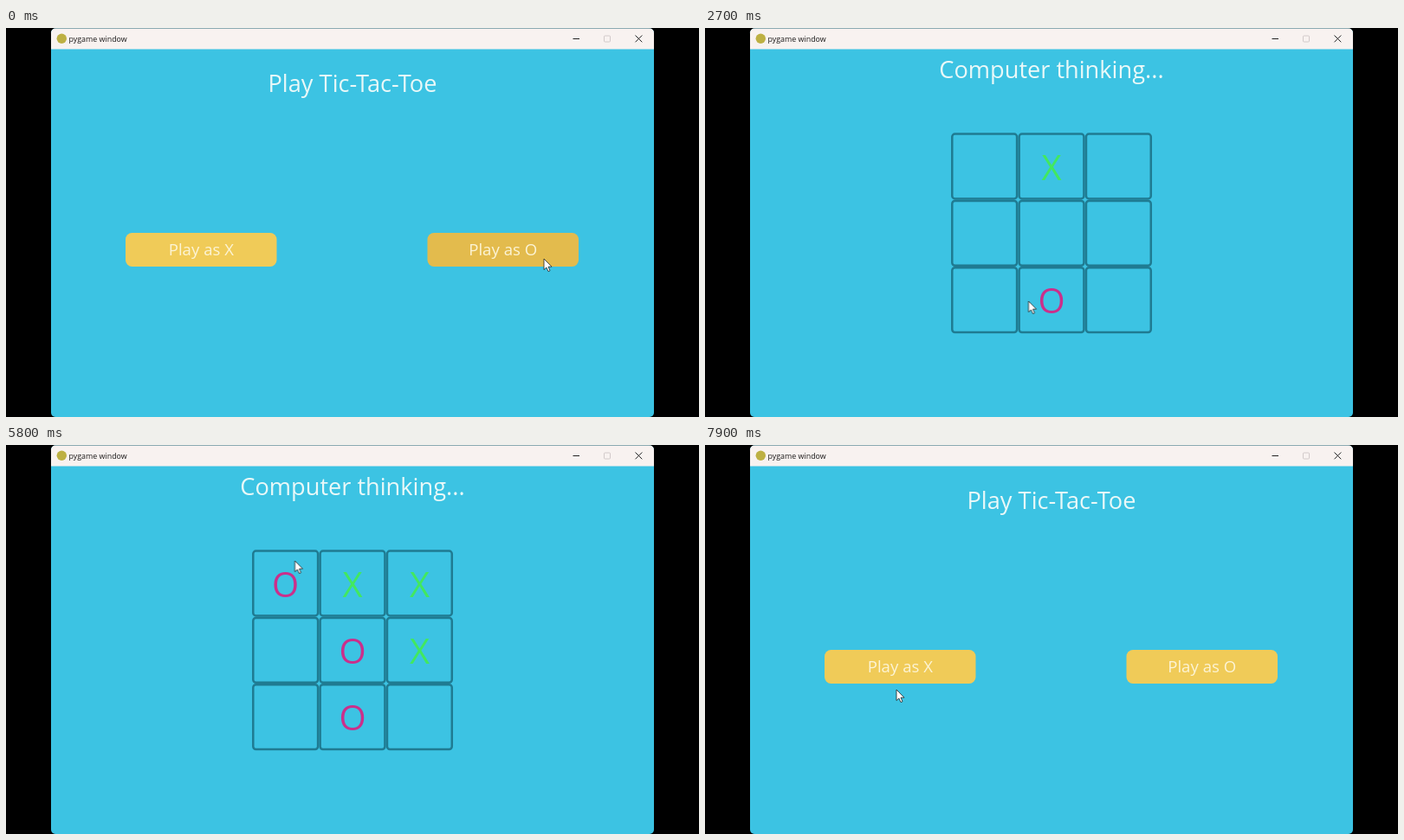
These frames come from a looping animation (800 px wide and 450 px high, 8000 ms). An HTML page:

```html
<!DOCTYPE html>
<html lang="en">
<head>
<meta charset="utf-8">
<title>Tic-Tac-Toe</title>
<style>
html, body { margin: 0; width: 100%; height: 100%; overflow: hidden; background: #000; }
svg { display: block; width: 800px; height: 450px; }
text { font-family: "Open Sans", "Noto Sans", sans-serif; text-anchor: middle; }

.title { font-size: 27.2px; fill: #e9f8f8; }
.label { font-size: 18.6px; fill: #fcf4d6; }
.caption { font-size: 8.9px; fill: #1c1a1a; text-anchor: start; }
.button { fill: #f0cb58; }
.cell { fill: none; stroke: #1f7b92; stroke-width: 2.5; }
.mark { font-size: 40px; }
.x { fill: #42e85f; }
.o { fill: #cb2f8b; }

/* Hard switches share one clock */
.step { animation: 8s step-end infinite; }
.menu { animation-name: menu; }
.board { animation-name: board; }
.thinking { animation-name: thinking; }
.turn { animation-name: turn; }
.over { animation-name: over; }
.hoverO { animation-name: hoverO; }
.hoverAgain { animation-name: hoverAgain; }
.x1 { animation-name: x1; }
.o1 { animation-name: o1; }
.x2 { animation-name: x2; }
.o2 { animation-name: o2; }
.x3 { animation-name: x3; }
.o3 { animation-name: o3; }
.cursor { animation: cursor 8s ease-in-out infinite; }

@keyframes menu { 0%, 93.75% { opacity: 1 } 12.5% { opacity: 0 } }
@keyframes board { 0%, 93.75% { opacity: 0 } 12.5% { opacity: 1 } }
@keyframes thinking {
  0%, 31.25%, 45%, 68.75% { opacity: 1 }
  23.75%, 37.5%, 51.25%, 75%, 100% { opacity: 0 }
}
@keyframes turn {
  0%, 31.25%, 45%, 68.75%, 100% { opacity: 0 }
  23.75%, 37.5%, 51.25% { opacity: 1 }
}
@keyframes over { 0% { opacity: 0 } 75%, 100% { opacity: 1 } }
@keyframes hoverO { 0% { fill: #e3bb4d } 12.5%, 100% { fill: #f0cb58 } }
@keyframes hoverAgain { 0% { fill: #f0cb58 } 83.75%, 100% { fill: #e3bb4d } }
@keyframes x1 { 0% { opacity: 0 } 23.75%, 100% { opacity: 1 } }
@keyframes o1 { 0% { opacity: 0 } 31.25%, 100% { opacity: 1 } }
@keyframes x2 { 0% { opacity: 0 } 37.5%, 100% { opacity: 1 } }
@keyframes o2 { 0% { opacity: 0 } 45%, 100% { opacity: 1 } }
@keyframes x3 { 0% { opacity: 0 } 51.25%, 100% { opacity: 1 } }
@keyframes o3 { 0% { opacity: 0 } 68.75%, 100% { opacity: 1 } }

@keyframes cursor {
  0%, 10% { transform: translate(621px, 267px) }
  16.25%, 23.75% { transform: translate(510.5px, 303px) }
  30%, 38.75% { transform: translate(373.5px, 316px) }
  43.75%, 60% { transform: translate(386.5px, 243px) }
  67.5%, 76.25% { transform: translate(333.5px, 134px) }
  85%, 91.25% { transform: translate(407.5px, 416px) }
  98.75%, 100% { transform: translate(221px, 283px) }
}
</style>
</head>
<body>
<svg viewBox="0 0 800 450">
  <defs>
    <rect id="cell" class="cell" x="285.3" y="122.6" width="74.8" height="74.8" rx="3.2"/>
    <g id="row">
      <use href="#cell"/>
      <use href="#cell" x="77.33"/>
      <use href="#cell" x="154.67"/>
    </g>
  </defs>

  <rect x="52" y="0.5" width="696" height="449.5" rx="5" fill="#3cc3e3"/>
  <path d="M52 24.5V5.5a5 5 0 0 1 5-5H743a5 5 0 0 1 5 5V24.5Z" fill="#f8f2f0"/>
  <circle cx="64.3" cy="12.2" r="5.7" fill="#bdb043"/>
  <text class="caption" x="72.5" y="15.5">pygame window</text>
  <g fill="none" stroke="#222">
    <path d="M654.5 12.5H662"/>
    <rect x="690.5" y="9" width="7" height="7" rx="1" stroke="#d2caca"/>
    <path d="M726.5 8.5L734.3 16.3M734.3 8.5L726.5 16.3"/>
  </g>

  <g class="step menu">
    <text class="title" x="400" y="73.5">Play Tic-Tac-Toe</text>
    <rect class="button" x="138" y="237" width="174.5" height="39" rx="7.5"/>
    <text class="label" x="225.3" y="263.3">Play as X</text>
    <rect class="button step hoverO" x="486.5" y="237" width="174.5" height="39" rx="7.5"/>
    <text class="label" x="573.7" y="263.3">Play as O</text>
  </g>

  <g class="step board">
    <text class="title step thinking" x="400" y="58">Computer thinking...</text>
    <text class="title step turn" x="400" y="58">Play as O</text>
    <use href="#row"/>
    <use href="#row" y="77.33"/>
    <use href="#row" y="154.67"/>
    <g class="mark">
      <text class="x step x1" x="400" y="175.5">X</text>
      <text class="o step o1" x="400" y="330.3">O</text>
      <text class="x step x2" x="477.5" y="253">X</text>
      <text class="o step o2" x="400" y="253">O</text>
      <text class="x step x3" x="477.5" y="175.5">X</text>
      <text class="o step o3" x="322.5" y="175.5">O</text>
    </g>
    <g class="step over">
      <text class="title" x="400" y="58">Game Over: X wins.</text>
      <text class="mark x" x="477.5" y="330.3">X</text>
      <rect class="button step hoverAgain" x="284" y="400" width="232" height="38.5" rx="7.5"/>
      <text class="label" x="400" y="426">Play Again</text>
    </g>
  </g>

  <path class="cursor" d="M0 0V12.6L2.9 10L5 14.6L7 13.7L5 9.2H9Z"
    fill="#fff" stroke="#222" stroke-width="0.8" stroke-linejoin="round"/>
</svg>
</body>
</html>
```
